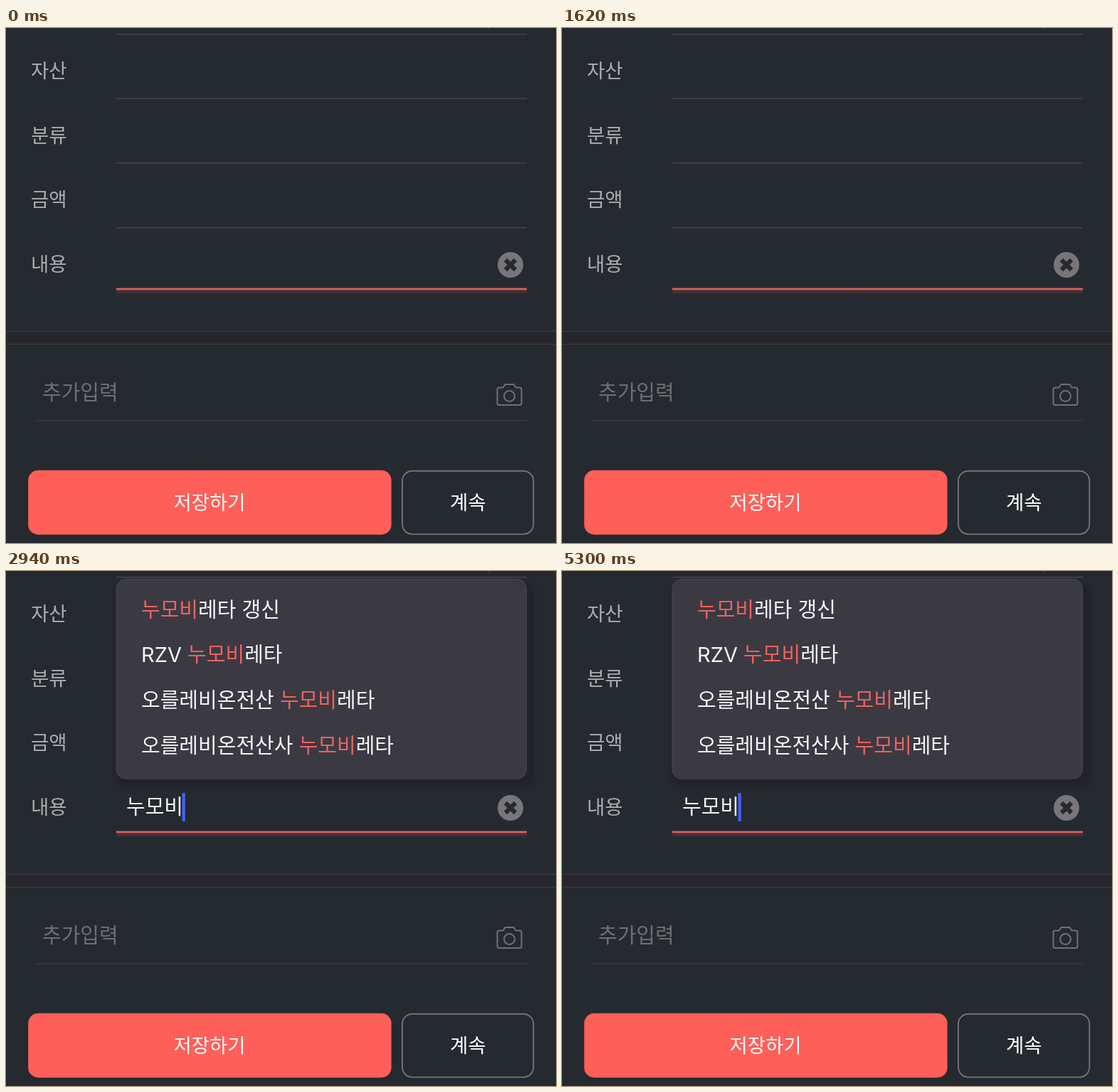
An HTML page for the animation above (5600 ms loop, 773 by 724 pixels).

```html
<!DOCTYPE html>
<html lang="ko">
<head>
<meta charset="utf-8">
<style>
  html, body { margin: 0; width: 100%; height: 100%; overflow: hidden; background: #252a30; }
  svg { display: block; width: 773px; height: 724px; }
  text { font-family: Inter, "Noto Sans CJK KR", "Noto Sans KR", "Noto Sans", sans-serif; white-space: pre; }
  .label { font-size: 27.5px; fill: #aeacaf; }
  .entry { font-size: 29px; fill: #f6f6f6; }
  .hint { font-size: 29px; fill: #716e71; }
  .button { font-size: 27.5px; fill: #fff; text-anchor: middle; }
  .hit { fill: #ee635e; }
</style>
</head>
<body>
<svg viewBox="0 0 773 724" xmlns="http://www.w3.org/2000/svg">
  <defs>
    <filter id="soft" x="-10%" y="-10%" width="120%" height="125%">
      <feGaussianBlur stdDeviation="2"/>
    </filter>
    <linearGradient id="glow" x1="0" y1="0" x2="0" y2="1">
      <stop offset="0" stop-color="#8a4447" stop-opacity=".55"/>
      <stop offset="1" stop-color="#8a4447" stop-opacity="0"/>
    </linearGradient>
  </defs>
  <rect width="773" height="724" fill="#252a30"/>
  <rect x="677" width="2" height="1" fill="#55555a"/>

  <path d="M155 8.7H732M155 99.2H732M155 190H732M155 280.8H732" stroke="#4b4347" stroke-width="1.5"/>
  <g class="label">
    <text x="35" y="69.5">자산</text>
    <text x="35" y="160.5">분류</text>
    <text x="35" y="251">금액</text>
    <text x="35" y="342">내용</text>
  </g>

  <rect x="155" y="367.5" width="577" height="7.5" fill="url(#glow)"/>
  <rect x="155" y="365.6" width="577" height="2.5" fill="#e2625d"/>
  <circle cx="709" cy="333" r="18" fill="#777779"/>
  <path d="M702 326L716 340M716 326L702 340" stroke="#282a2f" stroke-width="6.2"/>

  <rect y="427" width="773" height="18" fill="#27262b"/>
  <path d="M0 426.5H773M0 444.5H773" stroke="#413e41" stroke-width="1.2"/>

  <text class="hint" x="51" y="522.5">추가입력</text>
  <path d="M42 552H732" stroke="#3d3a3e" stroke-width="1.4"/>
  <g fill="none" stroke="#717074" stroke-width="2" stroke-linejoin="round">
    <path d="M693 505.5H698.5L701.5 501H713.5L716.5 505.5H722Q724.5 505.5 724.5 508V527.5Q724.5 530 722 530H693Q690.5 530 690.5 527.5V508Q690.5 505.5 693 505.5Z"/>
    <circle cx="707.5" cy="517.5" r="7.5"/>
  </g>

  <rect x="31.2" y="621.8" width="510.4" height="90.4" rx="14" fill="#ff5f59"/>
  <text class="button" x="286" y="677">저장하기</text>
  <rect x="557" y="622.8" width="184.3" height="88.8" rx="14" fill="none" stroke="#737377" stroke-width="1.9"/>
  <text class="button" x="649.3" y="677">계속</text>

  <g id="popup" visibility="hidden">
    <rect x="153" y="16" width="590" height="288" rx="15" fill="#232329" opacity=".9" filter="url(#soft)"/>
    <rect x="155" y="11.5" width="576.5" height="280.5" rx="13" fill="#3b3a43" stroke="#48474f"/>
    <g id="list"></g>
  </g>

  <text id="typed" class="entry" x="169" y="342.3"></text>
  <rect id="caret" x="169" y="312" width="4.2" height="40" rx="1" fill="#4163f2"/>
</svg>
<script>
const LOOP = 5600, FADE = 100, POPUP_AT = 2940;
const KEY_START = 2000, KEY_GAP = 180;
const STATES = ['ㄴ', '누', '누ㅁ', '누모', '누모ㅂ', '누모비'];
const WORD = '누모비', REST = '레타';
const ROWS = [['', ' 갱신'], ['RZV ', ''], ['오를레비온전산 ', ''], ['오를레비온전산사 ', '']];

// Caret visibility windows: start of fade in, start of fade out
const BLINKS = [[140, 680], [980, 1520], [1820, 3900], [4200, 4740], [5040, LOOP + FADE]];

const get = id => document.getElementById(id);
const popup = get('popup'), typed = get('typed'), caret = get('caret');
const clamp = v => Math.min(1, Math.max(0, v));

get('list').innerHTML = ROWS.map(([before, after], i) =>
  `<text class="entry" x="190" y="${64.5 + i * 63.9}">${before}<tspan class="hit">${WORD}</tspan>${REST}${after}</text>`
).join('');

function caretAlpha(t) {
  return Math.max(...BLINKS.map(([on, off]) =>
    clamp((t - on) / FADE) * clamp(1 - (t - off) / FADE)));
}

function draw(t) {
  const keys = Math.min(STATES.length, Math.floor((t - KEY_START) / KEY_GAP) + 1);
  const value = keys > 0 ? STATES[keys - 1] : '';
  if (typed.textContent !== value) typed.textContent = value;
  caret.setAttribute('x', 169 + value.length * 26.2);
  caret.setAttribute('opacity', caretAlpha(t));
  popup.setAttribute('visibility', t >= POPUP_AT ? 'visible' : 'hidden');
}

const start = performance.now();
function tick(now) {
  draw(Math.max(0, now - start) % LOOP);
  requestAnimationFrame(tick);
}
draw(0);
requestAnimationFrame(tick);
</script>
</body>
</html>
```
